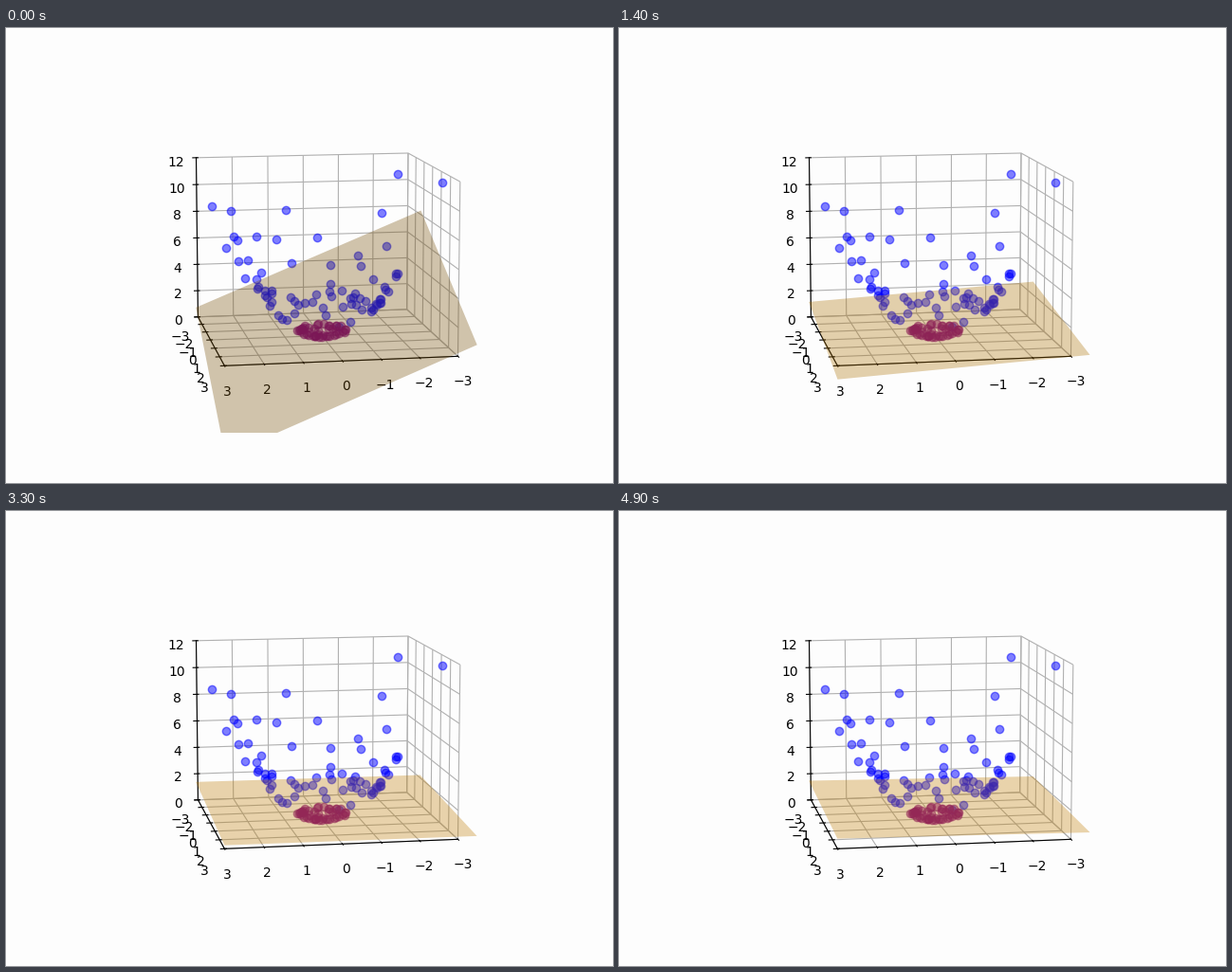
Animation of 640x480 px, one loop 5 s. Source, as a matplotlib script:

```python
import numpy as np
import matplotlib.pyplot as plt
from matplotlib.animation import FuncAnimation

FRAMES, INTERVAL = 50, 100
ELEV, AZIM = 10, 80
BOX = np.array([25 / 21, 25 / 21, 25 / 28])   # default 3D box size
SPAN = np.array([6, 6, 12])
MIDDLE = np.array([0, 0, 6])
CENTER = np.array([333.0, 237.4])             # box centre on the stage
PX_PER_UNIT = 199.784
BACKGROUND = "#fdfdfd"

# Scattered points high on the bowl, in stage pixels.
OUTLIERS = [
    (217, 188), (237, 193), (295, 192), (413, 154), (460, 163), (396, 195),
    (240, 220), (244, 224), (264, 220), (285, 223), (328, 221), (232, 232),
    (401, 230), (371, 240), (245, 246), (255, 245),
]


def stage_to_data(points):
    """Put stage pixels on the view-facing plane through the box centre."""
    e, a = np.radians([ELEV, AZIM])
    right = np.array([-np.sin(a), np.cos(a), 0])
    up = np.array([-np.sin(e) * np.cos(a), -np.sin(e) * np.sin(a), np.cos(e)])
    offset = (np.array(points) - CENTER) / PX_PER_UNIT
    world = np.outer(offset[:, 0], right) - np.outer(offset[:, 1], up)
    return (world / BOX * SPAN + MIDDLE).T


def bowl(radius, angle):
    return radius * np.cos(angle), radius * np.sin(angle), radius ** 2


def plane_at(step):
    """Plane heights: corner terms shrink as the common weight grows."""
    early = np.exp(-step / 2)
    weight = 0.85 + 0.3 * step + 0.15 * early
    slope = -14.1 + 0.31 * max(0, step - 15.5) + 0.5 * early
    twist = 0.3 - 13.2 * (1 - np.exp(-(step / 25) ** 1.5))
    level = 1.19 + 0.15 * step + 0.007 * step ** 2
    a = (slope - twist) / 13 / weight
    b = (slope + twist) / 13 / weight
    c = level / 2 / weight + 0.25 * (a + b)
    return a * X + b * Y + c


plt.rcParams["font.family"] = "DejaVu Sans"
fig = plt.figure(figsize=(6.4, 4.8), dpi=100, facecolor=BACKGROUND)
ax = fig.add_subplot(projection="3d", computed_zorder=False,
                     facecolor=BACKGROUND)
ax.view_init(elev=ELEV, azim=AZIM)
ax.set(xlim=(-3, 3), ylim=(-3, 3), zlim=(0, 12))
for axis in (ax.xaxis, ax.yaxis, ax.zaxis):
    axis.set_pane_color((1, 1, 1, 0))

rng = np.random.default_rng(4)
ring = bowl(rng.uniform(1.1, 2.1, 58), rng.uniform(0, 2 * np.pi, 58))
core = bowl(0.7 * np.sqrt(rng.random(45)), rng.uniform(0, 2 * np.pi, 45))
for cloud, color in ((stage_to_data(OUTLIERS), "blue"), (ring, "blue"),
                     (core, "purple")):
    ax.plot(*cloud, "o", color=color, alpha=0.5)

X, Y = np.meshgrid([-3.5, 3.0], [-3.5, 3.0])
surfaces = []


def update(step):
    while surfaces:
        surfaces.pop().remove()
    surfaces.append(ax.plot_surface(X, Y, plane_at(step), color="orange",
                                    alpha=0.32, linewidth=0, zorder=3))
    return surfaces


anim = FuncAnimation(fig, update, frames=FRAMES, interval=INTERVAL,
                     repeat=True, repeat_delay=0)
plt.show()
```
